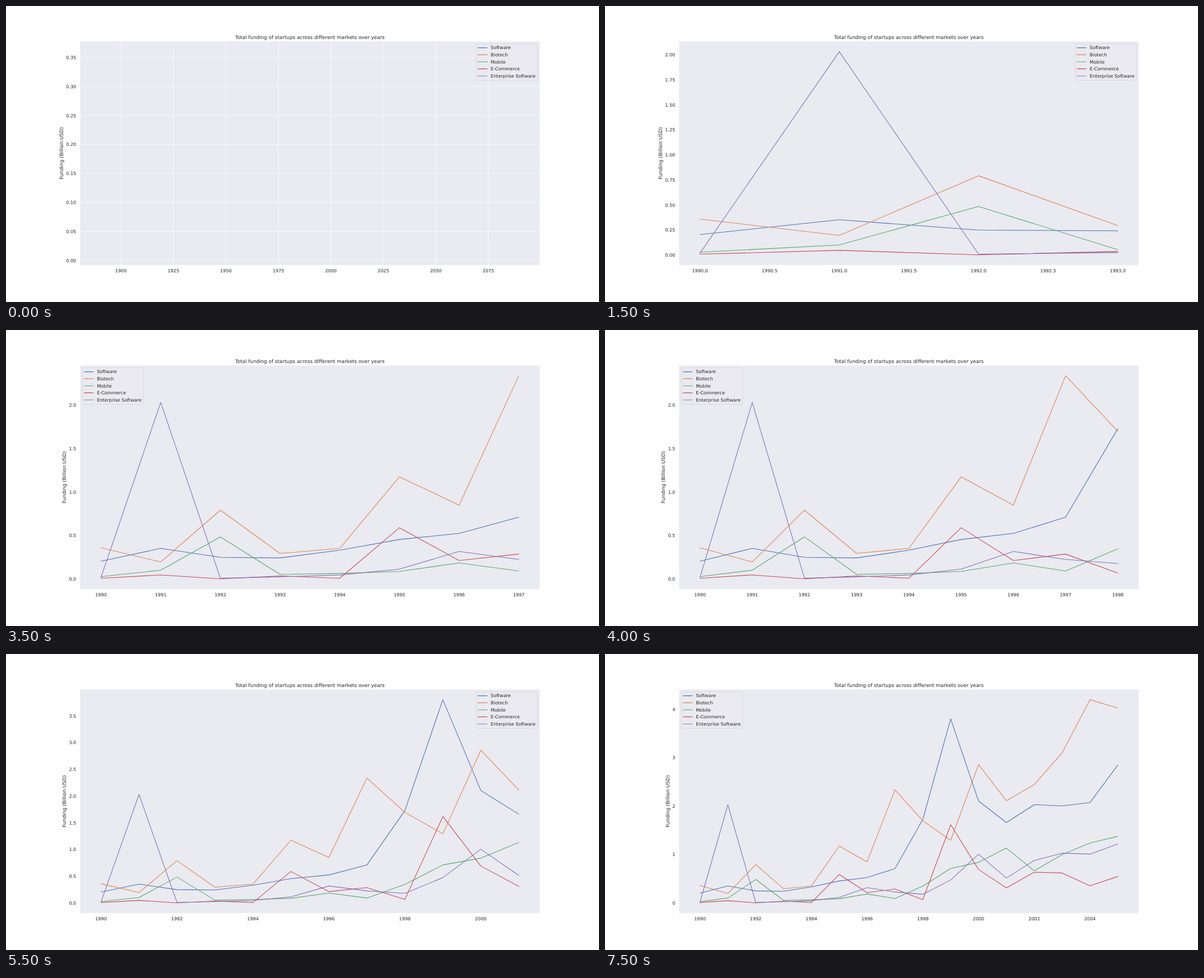
An HTML page that plays this animation: 1058 px wide and 529 px high, repeating every 8000 ms.

```html
<!DOCTYPE html>
<html lang="en">
<head>
<meta charset="utf-8">
<title>Startup funding by market</title>
<style>
  html, body { margin: 0; width: 100%; height: 100%; overflow: hidden; background: #fefefe; }
  svg { display: block; width: 1058px; height: 529px; }
  text { font: 11px "DejaVu Sans", sans-serif; fill: #262626; text-rendering: geometricPrecision; }
  .title { font-size: 12px; }
  .middle { text-anchor: middle; }
  .end { text-anchor: end; }
  .panel { fill: #eaeaf1; }
  .grid { stroke: #fff; stroke-width: 1; }
  .line { fill: none; stroke-width: 1.5; stroke-linecap: round; stroke-linejoin: round; }
  .frame { fill: #eaeaf1; fill-opacity: .8; stroke: #ccc; stroke-opacity: .8; }
</style>
</head>
<body>
<svg id="chart" viewBox="0 0 1440 720"></svg>
<script>
const FIRST_YEAR = 1990, STEP_MS = 500;
const BOX = { left: 180, right: 1296, top: 86.4, bottom: 630 };
const SERIES = [
  ['Software', '#4c72b0', [.205, .353, .25, .243, .332, .455, .525, .711, 1.728, 3.803, 2.105, 1.66, 2.03, 2.004, 2.073, 2.849]],
  ['Biotech', '#dd8452', [.36, .197, .792, .295, .353, 1.175, .85, 2.337, 1.697, 1.294, 2.858, 2.112, 2.444, 3.1, 4.198, 4.023]],
  ['Mobile', '#55a868', [.029, .102, .4855, .054, .065, .088, .186, .0925, .349, .713, .839, 1.134, .663, 1, 1.238, 1.376]],
  ['E-Commerce', '#c44e52', [.0097, .048, .003, .037, .0095, .59, .213, .288, .069, 1.618, .692, .311, .636, .619, .355, .547]],
  ['Enterprise Software', '#8172b3', [.02, 2.03, .01, .026, .047, .115, .318, .226, .18, .475, 1.006, .515, .878, 1.029, 1.009, 1.219]]
];
const STEPS = SERIES[0][2].length;
const LEGEND_LEFT = new Set([1, 7, 8, 9, 10, 14, 15]);

const chart = document.getElementById('chart');

// Data limits with a 5% margin; a single value is widened first.
function limits(min, max) {
  if (min === max) { min *= .95; max *= 1.05; }
  const margin = (max - min) * .05;
  return [min - margin, max + margin];
}

// At most nine intervals of a round size.
function ticks([lo, hi]) {
  const raw = (hi - lo) / 9;
  const power = 10 ** Math.floor(Math.log10(raw));
  const size = [1, 2, 2.5, 5, 10].find(m => m * power >= raw) * power;
  let digits = 0;
  while (Math.abs(size * 10 ** digits - Math.round(size * 10 ** digits)) > 1e-6) digits++;
  const list = [];
  for (let i = Math.ceil(lo / size); i * size <= hi; i++) {
    list.push({ value: i * size, label: (i * size).toFixed(digits) });
  }
  return list;
}

const scale = ([lo, hi], from, to) => v => from + (v - lo) / (hi - lo) * (to - from);
const text = (x, y, label, cls = '', extra = '') =>
  `<text x="${x}" y="${y}" class="${cls}" ${extra}>${label}</text>`;
const line = (points, cls, color = '') =>
  `<polyline points="${points.join(' ')}" class="${cls}" ${color && `stroke="${color}"`}/>`;

function legend(onLeft) {
  const width = 148.6, top = BOX.top + 5.5;
  const left = onLeft ? BOX.left + 5.5 : BOX.right - 5.5 - width;
  const rows = SERIES.map(([name, color], i) => {
    const y = top + 9.6 + i * 17.15;
    return line([[left + 4.4, y], [left + 26.4, y]], 'line', color) + text(left + 35.2, y + 3.9, name);
  });
  return `<rect x="${left}" y="${top}" width="${width}" height="89" rx="2.2" class="frame"/>` + rows.join('');
}

function draw(step) {
  const shown = SERIES.flatMap(s => s[2].slice(0, step + 1));
  const xLim = limits(FIRST_YEAR, FIRST_YEAR + step);
  const yLim = limits(Math.min(...shown), Math.max(...shown));
  const x = scale(xLim, BOX.left, BOX.right);
  const y = scale(yLim, BOX.bottom, BOX.top);
  const xTicks = ticks(xLim), yTicks = ticks(yLim);
  const parts = [`<rect x="180" y="86.4" width="1116" height="543.6" class="panel"/>`];

  if (step === 0) {
    xTicks.forEach(t => parts.push(line([[x(t.value), BOX.top], [x(t.value), BOX.bottom]], 'grid')));
    yTicks.forEach(t => parts.push(line([[BOX.left, y(t.value)], [BOX.right, y(t.value)]], 'grid')));
  } else {
    for (const [, color, values] of SERIES) {
      const points = values.slice(0, step + 1).map((v, i) => [x(FIRST_YEAR + i), y(v)]);
      parts.push(line(points, 'line', color));
    }
  }

  xTicks.forEach(t => parts.push(text(x(t.value), 648.5, t.label, 'middle')));
  yTicks.forEach(t => parts.push(text(170.5, y(t.value) + 4, t.label, 'end')));

  const decimals = yTicks[0].label.split('.')[1] || '';
  const labelWidth = 7 + (decimals ? 3.5 + 7 * decimals.length : 0);
  parts.push(
    text(738, 80.4, 'Total funding of startups across different markets over years', 'title middle'),
    text(0, 0, 'Funding (Billion USD)', 'title middle',
      `transform="translate(${163 - labelWidth} 358.2) rotate(-90)"`),
    legend(LEGEND_LEFT.has(step))
  );
  chart.innerHTML = parts.join('');
}

let current = -1;
const start = performance.now();
function tick(now) {
  const step = Math.floor(Math.max(0, now - start) / STEP_MS) % STEPS;
  if (step !== current) draw(current = step);
  requestAnimationFrame(tick);
}
tick(start);
</script>
</body>
</html>
```
